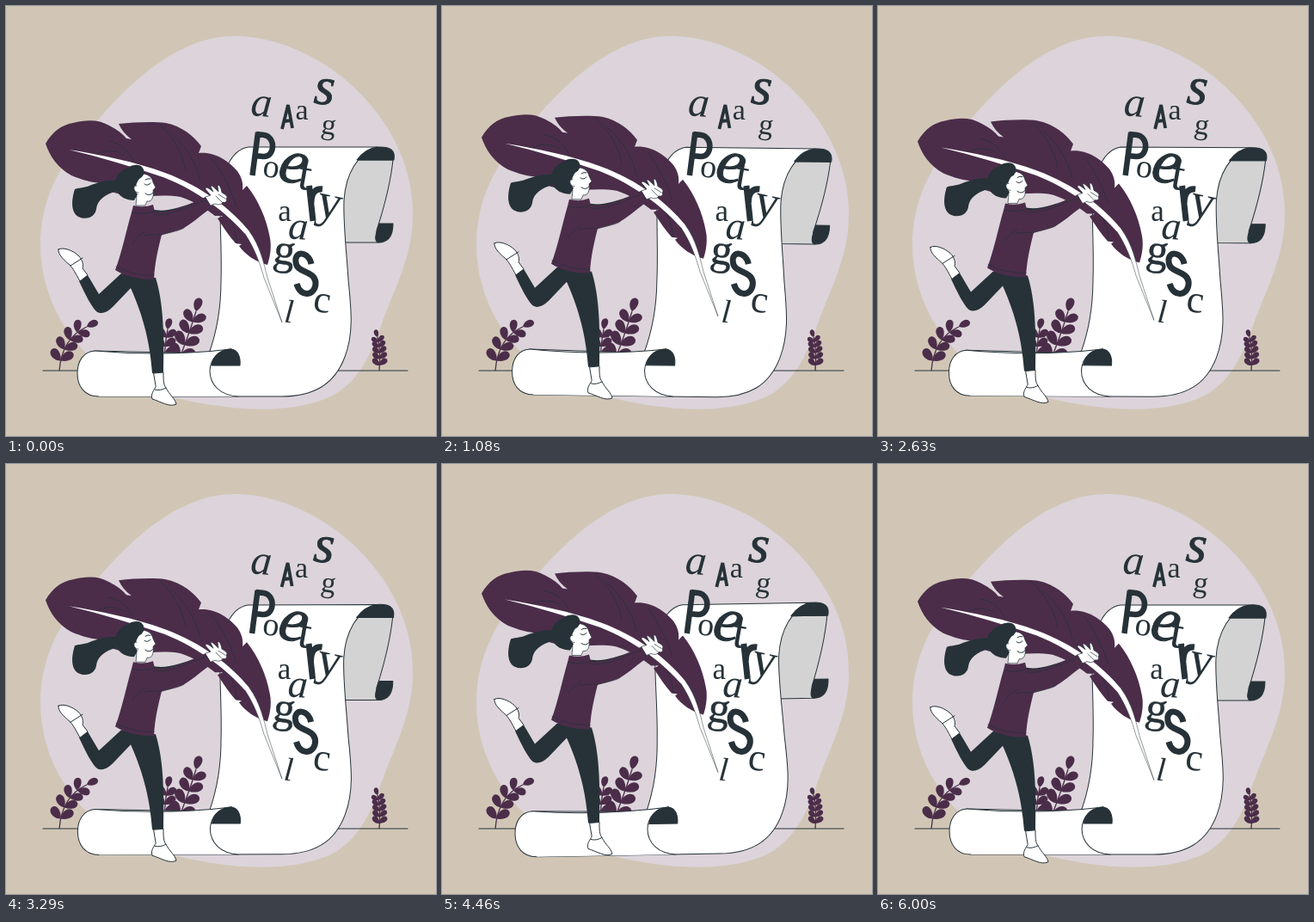
An HTML page for the animation above (6.04 s loop, 500 px wide and 500 px high).

```html
<!DOCTYPE html>
<html lang="en">
<head>
<meta charset="utf-8">
<title>Poetry</title>
<style>
html, body { margin: 0; width: 100%; height: 100%; overflow: hidden; background: #d1c6b6; }
svg { display: block; width: 100%; height: 100%; }
.dark { fill: #263238; }
.plum { fill: #4b2d4a; }
.paper { fill: #fff; }
.ink { stroke: #263238; stroke-width: 1; stroke-linejoin: round; stroke-linecap: round; }
.thin { stroke-width: .7; }
.line { fill: none; }
.sans { fill: none; stroke: #263238; }
#letters text { font-family: "Liberation Serif", "Times New Roman", serif; text-anchor: middle; fill: #263238; }
</style>
</head>
<body>
<svg viewBox="0 0 500 500">
  <path fill="#dcd4da" d="M265 35C330 35 395 75 432 125C462 165 473 205 473 243C473 295 448 335 435 375C424 405 412 432 385 450C358 466 315 471 275 468C225 464 165 452 120 425C75 397 40 340 40 278C40 225 62 180 111 128C150 83 205 35 265 35Z"/>
  <path class="ink line" d="M43 424H467"/>
  <g id="plants"></g>

  <g id="scroll" class="ink">
    <path fill="#d3d3d3" d="M409 179H450C447 207 440 233 431 261L433 275H392V225C393 204 401 188 409 179Z"/>
    <path class="dark" d="M434 253H450C450 266 445 275 433 275C428 274 429 267 434 253Z"/>
    <path class="paper" d="M432 164H282C262 167 250 192 249 230C249 260 251 290 250 320C250 352 245 379 236 404L103 401C90 402 83 413 83 427C83 442 91 454 108 454L320 454C358 454 382 440 394 408C405 379 401 350 398 318C396 285 392 255 393 226C395 195 409 171 432 164Z"/>
    <path class="dark" d="M432 164C447 163 453 168 451 179H408C414 171 422 165 432 164Z"/>
    <path class="paper" d="M103 401Q185 408 262 399C270 400 273 409 272 418L270 454H108" stroke="none"/>
    <path class="line" d="M103 401Q185 408 262 399C249 401 238 407 237 424C237 441 250 453 270 454"/>
    <path class="dark" d="M239 418C241 406 250 399 262 399C270 400 273 409 272 418Z"/>
  </g>

  <g id="letters">
    <g class="sans">
      <path stroke-width="3.800" d="M321 143L328 115L333 142M323.500 134L331.500 133"/>
      <path stroke-width="6.500" d="M286.500 197L293 147M291 149L300 150C314 152 313 176 299 175L289 174"/>
      <path stroke-width="7" d="M357 250L352.500 209M355 229C355 217 360 212 368 213"/>
      <path stroke-width="7" d="M355 300C352 285 335 284 337 298C338 311 358 307 360 321C361 336 343 341 338 323"/>
    </g>
  </g>

  <g id="figure">
    <path class="plum" d="M46 160C54 146 65 138 78 136C94 132 108 132 120 139C130 144 136 149 140 154L146 155C139 150 134 144 131 137C148 135 172 134 186 136C205 140 218 151 227 163L224 171C242 169 259 180 269 192C274 199 276 206 275 214L280 209C293 225 303 247 307 270C309 281 307 292 304 301C291 298 278 289 271 279L274 277L267 276C260 268 253 258 246 247L252 244H243C232 235 218 227 203 222C186 219 168 221 151 222C132 220 114 214 104 207L119 206C103 207 88 202 76 197C60 188 51 175 46 160Z"/>
    <path class="ink line thin" d="M106 172C116 166 129 168 137 173M119 157C133 159 142 168 148 180M178 137C194 151 206 172 209 191M192 148C209 162 222 184 226 204M240 178C253 196 262 215 268 233M253 234C262 247 267 260 269 276"/>
    <path class="paper" d="M73 167C110 173 150 181 185 194C228 210 262 236 283 262C296 280 300 300 304 316L321 368L300 316C295 298 289 282 278 265C257 241 225 216 184 199.500C148 187 110 176 73 167Z"/>
    <path class="ink line" style="stroke-width:.5" d="M283 262C296 280 300 300 304 316L321 368L300 316C295 298 289 282 278 265"/>

    <path class="dark" d="M134 311L108 335L95 313L85 320C92 335 99 349 105 355C110 359 117 357 124 350L145 328C157 355 167 385 170 427H183C184 380 183 345 174 316Z"/>
    <g class="ink paper">
      <path d="M61 283C67 280 77 284 84 290C90 296 90 302 89 305L95 313L86 320C81 311 78 305 74 301C68 296 60 289 61 283Z"/>
      <path class="line" d="M89 293L75 302"/>
      <path d="M172 427L183 426C183 435 183 440 186 444C190 452 197 457 198 463C190 467 180 460 170 457C168 451 172 447 174 443Z"/>
      <path class="line" d="M173 446Q179 448 186 444"/>
    </g>

    <path class="dark" d="M168 236C185 241 202 234 220 228L225 239L181 252Z"/>
    <path class="plum" d="M148 232Q160 235 171 231L173 239C193 242 213 230 232 222L240 234C229 241 219 251 207 258C198 262 188 264 181 266C177 282 173 298 172 318C156 318 139 315 127 307C135 286 140 260 146 240Z"/>
    <path class="ink line thin" d="M147 240Q159 243 173 239M160 267Q170 265 181 266M181 266C196 262 202 261 207 258M128 303Q149 314 172 313M162 262C154 267 150 271 147 277M172 242C194 245 212 232 232 226"/>

    <path class="paper ink thin" d="M151 198L159 195C167 196 170 200 171 205L174 211L171 214C172 222 170 228 164 227L162 232H151L152 221C146 217 146 207 151 198Z"/>
    <path class="dark" d="M160 196C162 189 157 184 150 185C147 185 144 186 142 188C135 190 129 196 127 203C116 202 106 206 97 209C90 212 84 211 80 213C77 222 74 239 84 245C95 250 104 244 105 236C106 226 115 219 129 215C132 222 140 226 149 226L153 219C149 214 151 206 155 201Q158 200 160 196Z"/>
    <path class="paper ink thin" d="M152 209C147 208 148 217 154 217"/>
    <path class="ink line" d="M161 207Q164 210 168 206M162 202Q165 200 168 201M162 218Q167 222 171 217"/>

    <path class="paper ink thin" d="M232 222L238 220L232 213C232 210 235 211 241 216L238 210C239 208 242 211 247 216L246 209C248 207 250 211 251 217C255 219 259 222 256 224C258 228 254 229 252 228C250 232 246 231 243 230L238 232Z"/>
    <path class="ink line thin" d="M244 221L251 228M247 219L255 224"/>
  </g>
</svg>
<script>
const LOOP = 6040;
const el = id => document.getElementById(id);

function add(parent, tag, attrs) {
  const node = document.createElementNS("http://www.w3.org/2000/svg", tag);
  for (const key in attrs) node.setAttribute(key, attrs[key]);
  return parent.appendChild(node);
}

// A bent stem with pairs of leaves and one leaf at the tip.
function plant(x0, y0, cx, cy, x1, y1, pairs, size, start) {
  const g = add(el("plants"), "g", { fill: "#4b2d4a" });
  add(g, "path", { d: `M${x0} ${y0}Q${cx} ${cy} ${x1} ${y1}`, fill: "none", stroke: "#4b2d4a", "stroke-width": 1.3 });
  const leaf = (x, y, angle, r) => add(g, "path", {
    d: `M0 0C${r * .3} ${-r * .5} ${r * 1.2} ${-r * .6} ${r * 1.25} 0C${r * 1.2} ${r * .5} ${r * .4} ${r * .4} 0 0Z`,
    transform: `translate(${x} ${y}) rotate(${angle})`
  });
  for (let i = 0; i <= pairs; i++) {
    const u = start + (1 - start) * i / pairs, v = 1 - u;
    const x = v * v * x0 + 2 * u * v * cx + u * u * x1;
    const y = v * v * y0 + 2 * u * v * cy + u * u * y1;
    const dir = Math.atan2(v * (cy - y0) + u * (y1 - cy), v * (cx - x0) + u * (x1 - cx)) * 180 / Math.PI;
    const r = size * (1 - .2 * u);
    if (i === pairs) leaf(x, y, dir, r);
    else for (const side of [-48, 48]) leaf(x, y, dir + side, r);
  }
}
plant(62, 424, 65, 386, 94, 373, 4, 14, .16);
plant(196, 424, 212, 385, 221, 355, 4, 16, .2);
plant(184, 424, 184, 395, 188, 376, 3, 13, .3);
plant(434, 424, 436, 401, 432, 385, 5, 9, .14);

// glyph, x, baseline, size, turn, italic, outline weight
const glyphs = [
  ["a", 296, 128, 49, 5, 1, 0],
  ["a", 344, 132, 34, 0, 0, 0],
  ["s", 369, 114, 62, 5, 1, .8],
  ["g", 374, 149, 34, 8, 0, 0],
  ["o", 307, 199, 38, 8, 0, 0],
  ["e", 330, 205, 74, 14, 1, 1],
  ["t", 345, 213, 54, 10, 0, 0],
  ["y", 373, 246, 57, 12, 0, 0],
  ["a", 324, 250, 35, 0, 0, 0],
  ["a", 339, 271, 46, 4, 1, 0],
  ["g", 322, 300, 50, 8, 0, .5],
  ["l", 328, 368, 38, 5, 1, 0],
  ["c", 366, 356, 45, 8, 0, 0]
];
for (const [char, x, y, size, turn, italic, weight] of glyphs) {
  add(el("letters"), "text", {
    x, y, "font-size": size, transform: `rotate(${turn} ${x} ${y})`,
    "font-style": italic ? "italic" : "normal",
    stroke: "#263238", "stroke-width": weight
  }).textContent = char;
}

const shake = [0, -1, 2, -4, 4, -4, 4, -4, 2, -1, 0];
const wave = p => 1 - Math.abs(2 * (p % 1) - 1);

function draw(now) {
  const p = now % LOOP / LOOP;
  const step = Math.floor(p * 10);
  const dx = shake[step] + (shake[step + 1] - shake[step]) * (p * 10 - step);
  const tilt = 2 * wave(p + .25) - 1;
  el("letters").setAttribute("transform", `translate(${dx} 0)`);
  el("figure").setAttribute("transform", `translate(0 ${-10 * wave(2 * p)})`);
  el("scroll").setAttribute("transform", `rotate(${tilt} 267 309)`);
}

const begin = performance.now();
function tick() {
  draw(performance.now() - begin);
  requestAnimationFrame(tick);
}
tick();
</script>
</body>
</html>
```
